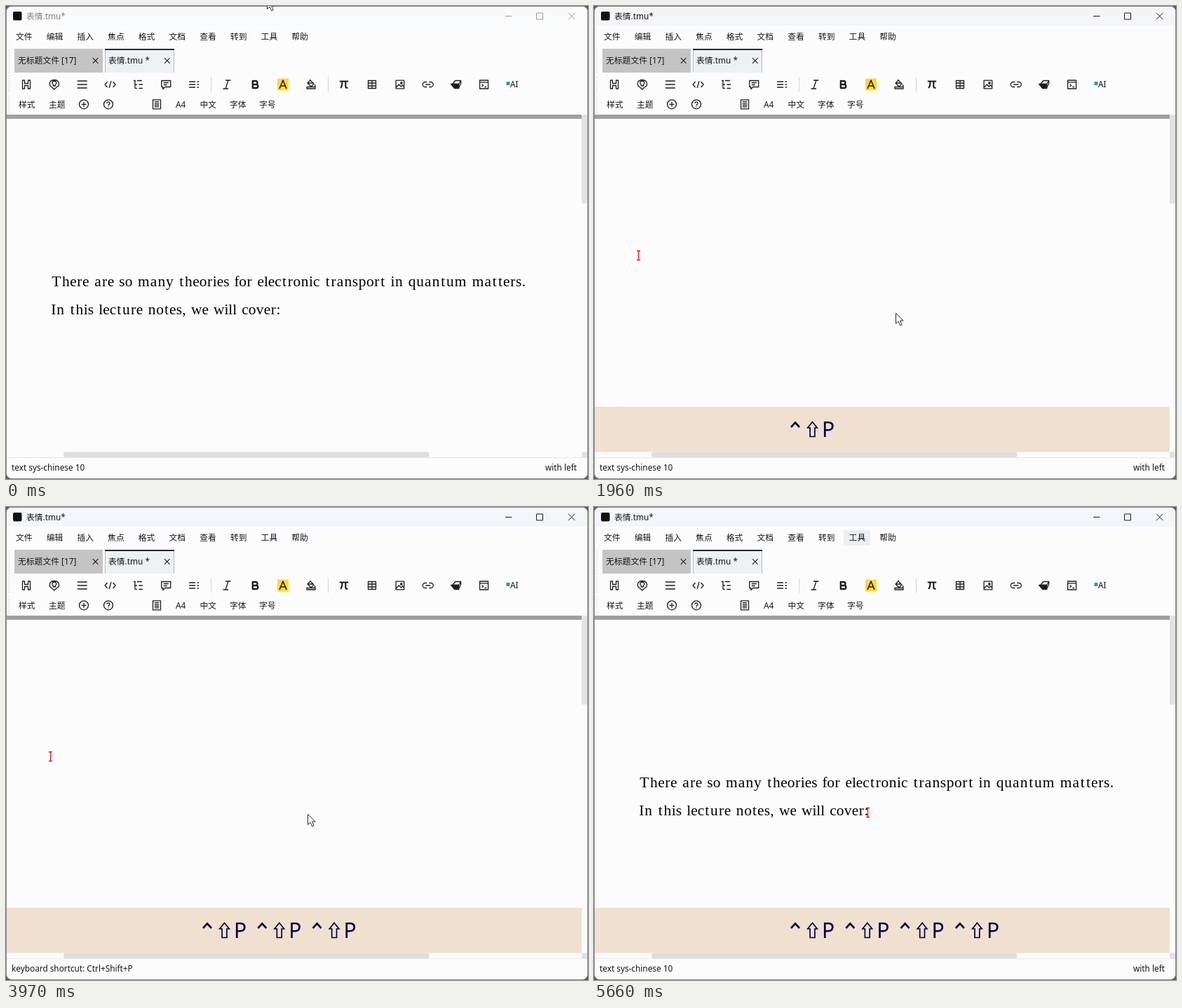
An HTML page for the animation above (5.9 s loop, 830 by 675 pixels).

```html
<!DOCTYPE html>
<html lang="zh-CN">
<head>
<meta charset="utf-8">
<title>Editor</title>
<style>
html, body { margin: 0; width: 100%; height: 100%; overflow: hidden; background: #5c5c5c; }
svg { display: block; width: 100vw; height: 100vh; }
text { font: 11.8px "Noto Sans", "Noto Sans CJK SC", "Noto Sans CJK", sans-serif; fill: #161616; white-space: pre; }
.doc text { font: 21.4px "Liberation Serif", serif; fill: #000; }
.key text { font-size: 30px; fill: #000040; }
.ico { fill: none; stroke: #1c1c1c; stroke-width: 1.3; stroke-linejoin: round; }
</style>
</head>
<body>
<svg id="stage" viewBox="0 0 830 675"></svg>
<script>
const LOOP = 5900, INK = '#1c1c1c';
const stage = document.getElementById('stage');

const rect = (x, y, w, h, fill, more = '') =>
  `<rect x="${x}" y="${y}" width="${w}" height="${h}" fill="${fill}" ${more}/>`;
const label = (x, y, s, more = '') => `<text x="${x}" y="${y}" ${more}>${s}</text>`;
const line = (d, color = INK, w = 1) =>
  `<path d="${d}" fill="none" stroke="${color}" stroke-width="${w}"/>`;
const group = (id, body, more = '') => `<g id="${id}" ${more}>${body}</g>`;

const ring = 'M-6.5 0a6.5 6.5 0 1 0 13 0a6.5 6.5 0 1 0-13 0';
const scroll = 'M-6-5.5h12M-4-5.5q-3 3 0 4h8q3-1 0-4M-2-1.5v5q0 2 3 2h5v-3h-5M-2 1.5h5';
// Icon outlines around their centre; "fill:" marks a solid part.
const icons = {
  heading: 'M-5.5-6h3v4.5h5V-6h3V6h-3V1.5h-5V6h-3z',
  idea: 'M-3.2 4C-9 1-7-6.5 0-6.5S9 1 3.2 4L0 7zM-1.5 2v-2q-2-1-1.5-3 1-2 3-2t3 2q.5 2-1.5 3v2z',
  lines: 'M-7-5h14M-7 0h14M-7 5h14',
  code: 'M-4-4l-3.5 4 3.5 4M4-4l3.5 4-3.5 4M1.5-5l-3 10',
  outline: 'M-6.5-5.5h3M-1.5-5.5h7M-4.5-5v9.5q0 1 1 1h2M-4.5 0h3M1 0h5.5M1 5.5h5.5',
  note: 'M-6.5-5.5h13v9h-8l-3 3v-3h-2zM-3.5-2.5h7M-3.5.5h5',
  listR: 'M-7-4h9M-7 0h9M-7 4h9M4.5-4h2.5M4.5 0h2.5M4.5 4h2.5',
  listL: 'M-3-4h10M-3 0h10M-3 4h10M-7-4h2.5M-7 0h2.5M-7 4h2.5',
  italic: 'M-2-6h7.5M-5.5 6h7.5M2-6l-4 12',
  bold: 'M-3.5-5h4.2a2.4 2.4 0 0 1 0 5h-4.2zM-3.5 0h5a2.5 2.5 0 0 1 0 5h-5z',
  letterA: 'M-5 6L0-6 5 6M-3.2 2h6.4',
  bucket: 'M-1.5-6.5l5.5 5.5-4 4-5-5 4.5-4.5M-4.5-2h8M5 0q2 3 0 3M-6 3.5h12v2.5h-12z',
  pi: 'M-6.2-4.5h12.4M-2.5-4.5c0 5-.6 8-2.5 9.5M2.3-4.5v7q0 3 3.2 2',
  table: 'M-5.5-5.5h11v11h-11zM-5.5-2h11M-5.5 2h11M0-5.5v11',
  image: 'M-5.8-5.8h11.6v11.6h-11.6zM-5.5 4l4-4 3 3 2-2 2.5 2.5M1-3h2v2h-2z',
  link: 'M-1.5-3.5h-2.5a3.5 3.5 0 0 0 0 7h2.5M1.5-3.5h2.5a3.5 3.5 0 0 1 0 7h-2.5M-3.5 0h7',
  eraser: 'M-1-5.5h8l-3 5h-9zM4-.5l3-5v4l-3 6',
  eraserBase: 'fill:M-7-.5h11v6h-6z',
  shell: 'M-6-6h12v12h-12zM-6-3.2h12M-3-.5l2 1.8-2 1.8M.8 3.5h2.8',
  plus: ring + 'M0-3.5v7M-3.5 0h7',
  help: ring + 'M-2-1.4a2 2 0 1 1 3.2 1.5q-1.2.7-1.2 1.8M0 3.2v1.1',
  page: 'M-5.5-6.5h11v13h-11zM-3.2-3.6h6.4M-3.2-1.2h6.4M-3.2 1.2h6.4M-3.2 3.6h6.4',
  lambda: 'M-5-5h2.5q1 0 1.5 1l4 8q.5 1 2 1M-.2-1.5l-4.3 6.5',
  thumb: 'M-4.5 5.5v-5l4-6q2 0 1 3l-.6 2h4q1.5 2-.4 6h-8',
  tree: 'M-5.5-6v12M-5.5-4.5h11M-5.5 0h11M-5.5 4.5h11',
  plusMinus: 'M-4-6v6M-7-3h6M1 4h6M5-5l-9 10',
  percent: 'M5-5l-10 10M-5-4h3v3h-3zM1 0l5 5M6 0l-5 5',
  tee: 'M-5-5.5h10M0-5.5v11',
  brackets: 'M-5-5.5h-3v11h3M5-5.5h3v11h-3',
  dots: 'fill:M-5-1h2.5v2.5h-2.5zM-1.2-1h2.5v2.5h-2.5zM2.6-1h2.5v2.5h-2.5z',
  fold: scroll, foldNext: scroll + 'M3 1l3 3',
  top: 'M-6.5-4.5h13M-6.5 5l6.5-6.5 6.5 6.5',
  up: 'M-7 3.5l7-7 7 7',
  down: 'M-7-3.5l7 7 7-7',
  bottom: 'M-6.5 4.5h13M-6.5-5l6.5 6.5 6.5-6.5',
  inLeft: 'M-5.5-2.5v-3.2h11v11.4h-11v-3.2M3-0h-9M-3.5-2.5l-2.5 2.5 2.5 2.5',
  outRight: 'M5.5-2.5v-3.2h-11v11.4h11v-3.2M-3-0h9M3.5-2.5l2.5 2.5-2.5 2.5',
  cancel: ring + 'M-2.5-2.5l5 5M2.5-2.5l-5 5',
  wrench: 'M-6 4.5l5-5q-1-4 2-5.5h2l-2 3 2 2 3-2q1 5-4.5 5.5l-5 5q-1.5.5-2.5-3z',
  gear: 'M-1.5-6.5h3l.6 2 2 .8 2-1 1.5 2.5-1.5 1.5v1.5l1.5 1.5-1.5 2.5-2-.8-2 1-.6 1.8h-3l-.6-1.8-2-1-2 .8-1.5-2.5 1.5-1.5v-1.5l-1.5-1.5 1.5-2.5 2 1 2-.8zM-2 0a2 2 0 1 0 4 0a2 2 0 1 0-4 0'
};
const icon = (name, x, y, w = 1.3, color = INK) => {
  const solid = icons[name].startsWith('fill:');
  return `<path class="ico" transform="translate(${x} ${y})" d="${icons[name].replace('fill:', '')}" ` +
    `style="stroke:${color};stroke-width:${w}${solid ? ';fill:' + color : ''}"/>`;
};
const iconRow = (names, x, step, y) =>
  names.split(' ').map((n, i) => n === '-' ? '' : icon(n, x + i * step, y)).join('');
const menu = names => names.split(' ').map((s, i) => label(14 + i * 43.7, 48.3, s)).join('');
const divider = x => line(`M${x} 101.5v21`, '#d4d4d4');
const cross = (x, y, r, color = INK) =>
  line(`M${x - r} ${y - r}l${2 * r} ${2 * r}M${x + r} ${y - r}l${-2 * r} ${2 * r}`, color, 1.1);

// Document lines are set on Computer Modern advance widths.
const advances = {
  278: 'iIl,:.', 306: 'f', 333: ' ', 361: 'I', 389: 't', 392: 'r', 394: 's', 444: 'ec',
  500: 'ao', 528: 'vyq', 556: 'hnup', 722: 'Tw', 833: 'm'
};
const advance = {};
for (const w in advances) for (const c of advances[w]) advance[c] = w * 0.02134;
const pen = document.createElement('canvas').getContext('2d');
pen.font = '21.4px "Liberation Serif", serif';
function typeset(x, y, s) {
  const xs = [...s].map(c => {
    const at = x + (advance[c] - pen.measureText(c).width) / 2;
    x += advance[c];
    return at.toFixed(2);
  });
  return label(xs.join(' '), y, s);
}

const chord = i => `<g class="key" id="key${i}" transform="translate(${280 + i * 78.3} 0)">` +
  line('M1 601l6-6.5 6 6.5', '#000040', 2.6) +
  line('M31.5 593.5l-6.8 8.5h3.4v12.5h6.8V602h3.4z', '#000040', 1.7) +
  label(45, 614.5, 'P') + '</g>';

const textBars = menu('文件 编辑 插入 焦点 格式 文档 查看 转到 工具 帮助') +
  iconRow('heading idea lines code outline note listR', 29, 39.85, 112) +
  divider(292.5) + icon('italic', 315, 112) + icon('bold', 355.3, 112, 2.3) +
  rect(387, 103.5, 16, 17, '#ffd83f') + icon('letterA', 395, 112, 1.6) + icon('bucket', 435, 112) +
  divider(459.5) + icon('pi', 482, 112, 2.1) +
  iconRow('table image link eraser shell', 522, 39.9, 112) + icon('eraserBase', 641.7, 112) +
  rect(713.5, 108, 5, 5, '#2ba86a') + label(719, 116, 'AI', 'font-weight="500"') +
  label(18, 144.8, '样式') + label(61, 144.8, '主题') + icon('plus', 111, 140.3) +
  icon('help', 146, 140.3) + icon('page', 215, 140.3) + label(242, 144.8, 'A4') +
  label(276.5, 144.8, '中文') + label(319, 144.8, '字体') + label(361, 144.8, '字号');

const sourceBars = menu('文件 编辑 插入 源码 焦点 格式 文档 查看 转到 工具 帮助') +
  iconRow('listL - thumb tree', 29, 39.8, 112) + icon('lambda', 69, 112, 1.8) + divider(172.5) +
  iconRow('plusMinus percent - brackets', 196, 39.9, 112) + icon('tee', 276, 112, 1.7) +
  icon('dots', 315.7, 112, 0) + divider(339.5) + iconRow('fold foldNext foldNext', 363, 40, 112) +
  divider(466.5) + icon('italic', 489, 112) + icon('bold', 530, 112, 2.3) + icon('bucket', 570, 112) +
  iconRow('top up down bottom', 26.3, 34.7, 140.3) + label(192, 144.8, '显示序言') +
  icon('inLeft', 265, 140.3) + icon('outRight', 300, 140.3) +
  icon('cancel', 334.8, 140.3, 1.4, '#d40f1c') + iconRow('wrench gear help', 369.7, 34.6, 140.3);

const handle = (y, h) => `<path d="M4.5 ${y}v${h}" stroke="#bdbdbd" stroke-dasharray="1 2"/>`;

stage.innerHTML =
  rect(0, 0, 830, 675, '#5c5c5c') +
  rect(.5, .5, 829, 674, '#fcfcfc', 'rx="7.5" stroke="#858585"') +
  group('titleBar', '<path d="M1 28V8q0-7 7-7h814q7 0 7 7v20z"/>') +
  rect(10, 8, 12.5, 12.5, '#111', 'rx="2"') +
  group('title', label(29, 18.8, '表情.tmu*')) +
  group('controls', '<path d="M712 14.5h9.5M756.5 10h9v9h-9zM802 9.8l9.4 9.4M811.4 9.8l-9.4 9.4"/>', 'fill="none"') +
  handle(62, 34) + handle(100, 24) + handle(128, 25) +
  rect(12, 61, 126, 34, '#c4c4c4') + label(17, 82.3, '无标题文件 [17]') + cross(127.6, 78, 3.8) +
  rect(141, 61, 99, 34, '#edf1f3') + line('M141.5 62v33M239.5 62v33', '#b5b9bb') +
  rect(141, 61, 99, 2, '#262a2c') + label(146, 82.3, '表情.tmu *') + cross(229.8, 78, 3.8) +
  group('hover', rect(356, 33, 38, 22, '#eceff2')) +
  group('textBars', textBars) + group('sourceBars', sourceBars) +
  rect(1, 155, 820, 6, '#a0a0a0') +
  rect(821, 155, 8, 127, '#e2e2e2', 'rx="2"') +
  group('prose', typeset(64, 400, 'There are so many theories for electronic transport in quantum matters.') +
    typeset(64, 440.3, 'In this lecture notes, we will cover:'), 'class="doc"') +
  group('caret', line('M-2.5 .5h5M0 .5v13M-2.5 13.5h5', '#e8101c', 1.3)) +
  group('banner', rect(1, 572, 820, 64.5, '#f0e0d0') + [0, 1, 2, 3].map(chord).join('')) +
  rect(82, 636.5, 521.5, 7.5, '#dedede', 'rx="3"') + rect(821, 636.5, 8, 7.5, '#e2e2e2') +
  line('M1 644.5h828', '#e6e6e6') +
  group('status', label(8, 663, 'text sys-chinese 10') + label(814, 663, 'with left', 'text-anchor="end"')) +
  group('shortcut', label(8, 663, 'keyboard shortcut: Ctrl+Shift+P')) +
  group('mouse', '<path d="M.5 .5V15.3L4 12l2.6 5.8 2.5-1.1L6.6 11h4.6z" fill="#fff" stroke="#2a2a2a" stroke-linejoin="round"/>');

const el = {};
stage.querySelectorAll('[id]').forEach(e => el[e.id] = e);
const show = (id, on) => el[id].style.display = on ? '' : 'none';
const within = (t, spans) => spans.some(([a, b]) => t >= a && t < b);

// Pointer keys: time, x, y
const path = [
  [0, 372, -11], [180, 390, 45], [300, 407, 117], [420, 432, 300], [510, 450, 470], [600, 460, 556],
  [650, 456, 542], [710, 444, 490], [770, 437, 461], [830, 430, 438], [5003, 430, 438],
  [5120, 495, 350], [5230, 437, 195], [5290, 428, 140], [5350, 407, 112], [5420, 387, 63],
  [5500, 395, 30], [5570, 380, 5], [5620, 363, -17.5], [LOOP, 363, -17.5]
];
const moves = [[0, 50, 50], [50, 600, 550 / 12], [600, 650, 50], [650, 830, 60], [5050, 5620, 47.5]];
function pointer(t) {
  const m = moves.find(([a, b]) => t >= a && t < b);
  if (m) t = m[0] + Math.floor((t - m[0]) / m[2] + 1e-6) * m[2];
  else if (t < 5050) t = 830;
  const i = path.findIndex(k => k[0] > t);
  const [a, b] = [path[i - 1], path[i]], f = (t - a[0]) / (b[0] - a[0]);
  return [a[1] + (b[1] - a[1]) * f, a[2] + (b[2] - a[2]) * f];
}

function render(t) {
  const active = t >= 710;
  const cleared = within(t, [[1960, 3320], [3970, 4500]]);
  const source = within(t, [[2290, 3610], [4320, 4830]]);
  const shortcut = within(t, [[2290, 5430]]);
  const presses = [1960, 3320, 3970, 4500].filter(k => t >= k).length;

  el.titleBar.setAttribute('fill', active ? '#f3f5f9' : '#f9fafb');
  el.title.style.opacity = active ? 1 : .52;
  el.controls.setAttribute('stroke', active ? '#1c1c1c' : '#9a9a9a');
  show('textBars', !source);
  show('sourceBars', source);
  show('hover', t >= 5430);
  show('prose', !cleared);
  show('caret', active);
  el.caret.setAttribute('transform', cleared ? 'translate(63.5 349)' : 'translate(390.5 429)');
  show('banner', presses > 0);
  for (let i = 0; i < 4; i++) show('key' + i, i < presses);
  show('status', !shortcut);
  show('shortcut', shortcut);
  show('mouse', t < 5660);
  el.mouse.setAttribute('transform', `translate(${pointer(t).map(v => v.toFixed(1))})`);
}

const start = performance.now();
function tick() {
  render((performance.now() - start) % LOOP);
  requestAnimationFrame(tick);
}
tick();
</script>
</body>
</html>
```
